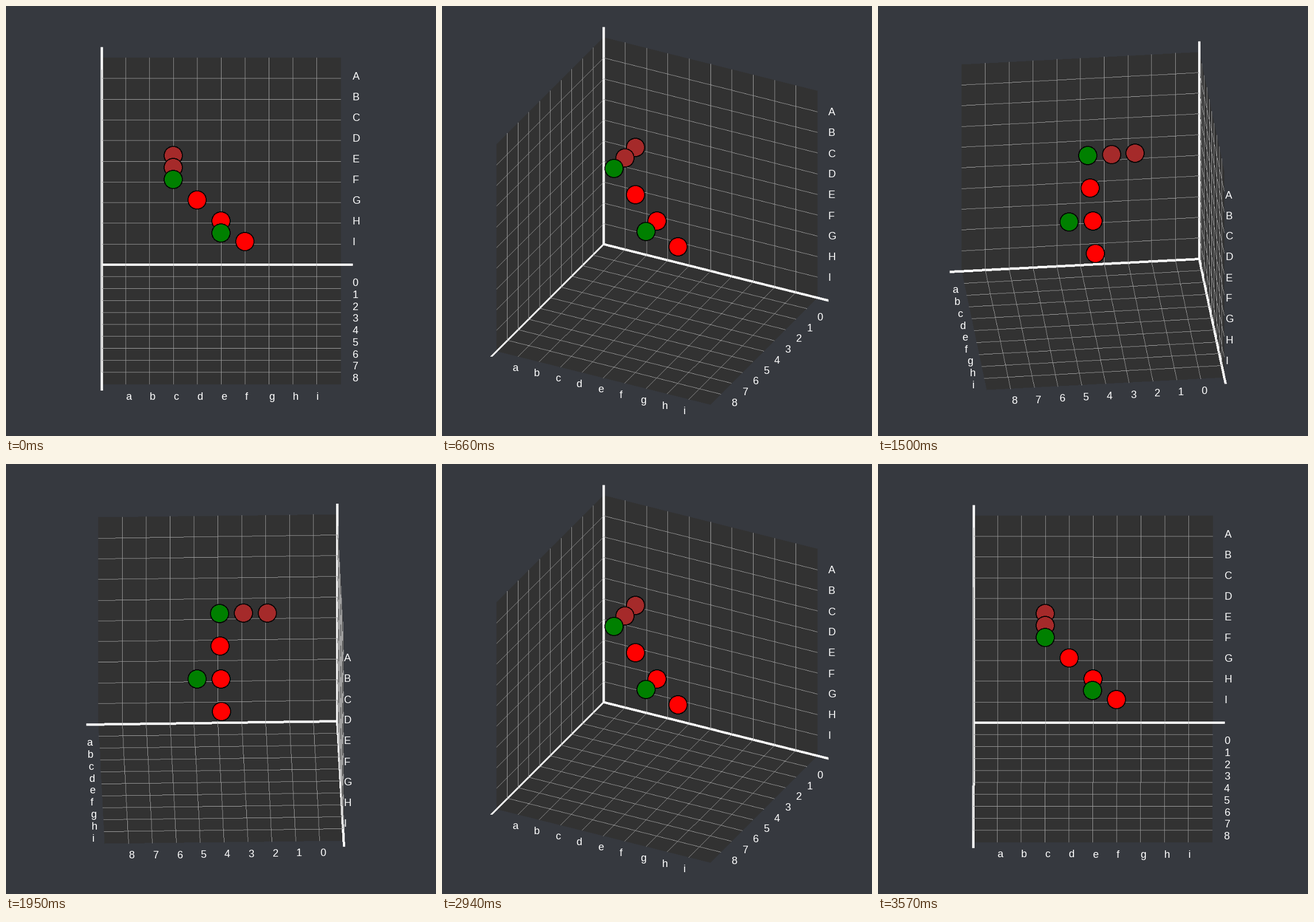
A matplotlib script for the animation above (3.6 s loop, 748 by 748 pixels).

```python
import math

import numpy as np
import matplotlib.pyplot as plt
from matplotlib.animation import FuncAnimation

STAGE, DPI = 748, 88
FRAMES, INTERVAL = 120, 30
SIZE = 900            # the scene is rasterised larger, then scaled to the stage
UNIT = 50
TILT = math.radians(30)
CELLS = 10
REACH = CELLS + 0.5   # axes and labels stick out past the walls

BACKDROP = (54, 57, 63)
WALL = (50, 50, 50)
GRID = (160, 160, 160)
WHITE = (255, 255, 255)
BLACK = (0, 0, 0)
RED, GREEN, BROWN = (255, 0, 0), (0, 128, 0), (165, 42, 42)

# x, height, depth, colour; farthest first
BALLS = [
    (3, 7, 3, BROWN), (3, 7, 4, BROWN), (3, 7, 5, GREEN),
    (4, 6, 5, RED), (5, 5, 5, RED), (5, 5, 6, GREEN), (6, 4, 5, RED),
]
BALL_RADIUS, RIM = 20, 2

LABELS = []
for n in range(1, CELLS):
    LABELS.append(("IHGFEDCBA"[n - 1], (REACH, n + 0.4, 0)))
    LABELS.append((str(n - 1), (REACH, 0, n)))
    LABELS.append(("abcdefghi"[n - 1], (n, 0, REACH)))
BASELINE = 20         # from a label's anchor down to its baseline

ROWS, COLS = np.ogrid[0:SIZE, 0:SIZE]


def turn(frame):
    """Swing from 0 to 90 degrees and back once per loop."""
    return math.pi / 4 * (1 - math.cos(2 * math.pi * frame / FRAMES))


def make_camera(angle):
    c, s = math.cos(angle), math.sin(angle)

    def project(point):
        x, h, z = (v - CELLS / 2 for v in point)
        near = x * s + z * c
        px = SIZE / 2 + UNIT * (x * c - z * s)
        py = SIZE / 2 + UNIT * (near * math.sin(TILT) - h * math.cos(TILT))
        return int(px + 1e-6), int(py + 1e-6)

    return project


def draw_line(img, p, q, color, width=1):
    """Hard-edged line, thickened along the minor direction."""
    dx, dy = q[0] - p[0], q[1] - p[1]
    n = max(abs(dx), abs(dy), 1)
    t = np.arange(n + 1) / n
    xs = np.floor(p[0] + dx * t + 0.5).astype(int)
    ys = np.floor(p[1] + dy * t + 0.5).astype(int)
    for k in range(-(width // 2), width - width // 2):
        if abs(dx) > abs(dy):
            img[ys + k, xs] = color
        else:
            img[ys, xs + k] = color


def fill_quad(img, pts, color):
    (ax, ay), (bx, by), _, (dx, dy) = pts
    area = (bx - ax) * (dy - ay) - (by - ay) * (dx - ax)
    if area == 0:
        return
    if area < 0:
        pts = pts[::-1]
    mask = np.ones((SIZE, SIZE), bool)
    for (x0, y0), (x1, y1) in zip(pts, pts[1:] + pts[:1]):
        mask &= (x1 - x0) * (ROWS - y0) >= (y1 - y0) * (COLS - x0)
    img[mask] = color


def draw_ball(img, center, color):
    cx, cy = center
    r = BALL_RADIUS
    box = img[cy - r:cy + r, cx - r:cx + r]
    side = np.arange(-r, r) + 0.5
    dist = np.hypot(side[:, None], side)
    box[dist <= r] = BLACK
    box[dist <= r - RIM] = color


# Each wall maps two in-plane coordinates to space.
WALLS = [
    lambda u, v: (u, v, 0),
    lambda u, v: (0, v, u),
    lambda u, v: (u, 0, v),
]
AXES = [(REACH, 0, 0), (0, REACH, 0), (0, 0, REACH)]


def render(project):
    img = np.empty((SIZE, SIZE, 3), np.uint8)
    img[:] = BACKDROP
    corners = [(0, 0), (CELLS, 0), (CELLS, CELLS), (0, CELLS)]
    for wall in WALLS:
        fill_quad(img, [project(wall(*c)) for c in corners], WALL)
    for tip in AXES:
        draw_line(img, project((0, 0, 0)), project(tip), WHITE, 5)
    for wall in WALLS:
        for n in range(1, CELLS):
            draw_line(img, project(wall(n, 0)), project(wall(n, CELLS)), GRID)
            draw_line(img, project(wall(0, n)), project(wall(CELLS, n)), GRID)
    for x, h, z, color in BALLS:
        draw_ball(img, project((x, h, z)), color)
    return img


fig = plt.figure(figsize=(STAGE / DPI, STAGE / DPI), dpi=DPI,
                 facecolor=[v / 255 for v in BACKDROP])
ax = fig.add_axes([0, 0, 1, 1])
ax.axis("off")
picture = ax.imshow(np.zeros((SIZE, SIZE, 3), np.uint8), aspect="auto",
                    extent=(0, SIZE, SIZE, 0), interpolation="bilinear",
                    resample=False)
ax.set_xlim(0, SIZE)
ax.set_ylim(SIZE, 0)
texts = [ax.text(0, 0, label, color="white", family="Liberation Sans",
                 size=18.2 * 72 / DPI, ha="left", va="baseline")
         for label, _ in LABELS]


def update(frame):
    project = make_camera(turn(frame))
    picture.set_data(render(project))
    for text, (_, anchor) in zip(texts, LABELS):
        x, y = project(anchor)
        text.set_position((x, y + BASELINE))
    return [picture, *texts]


anim = FuncAnimation(fig, update, frames=FRAMES, interval=INTERVAL,
                     repeat=True, repeat_delay=0, blit=False)
plt.show()
```
